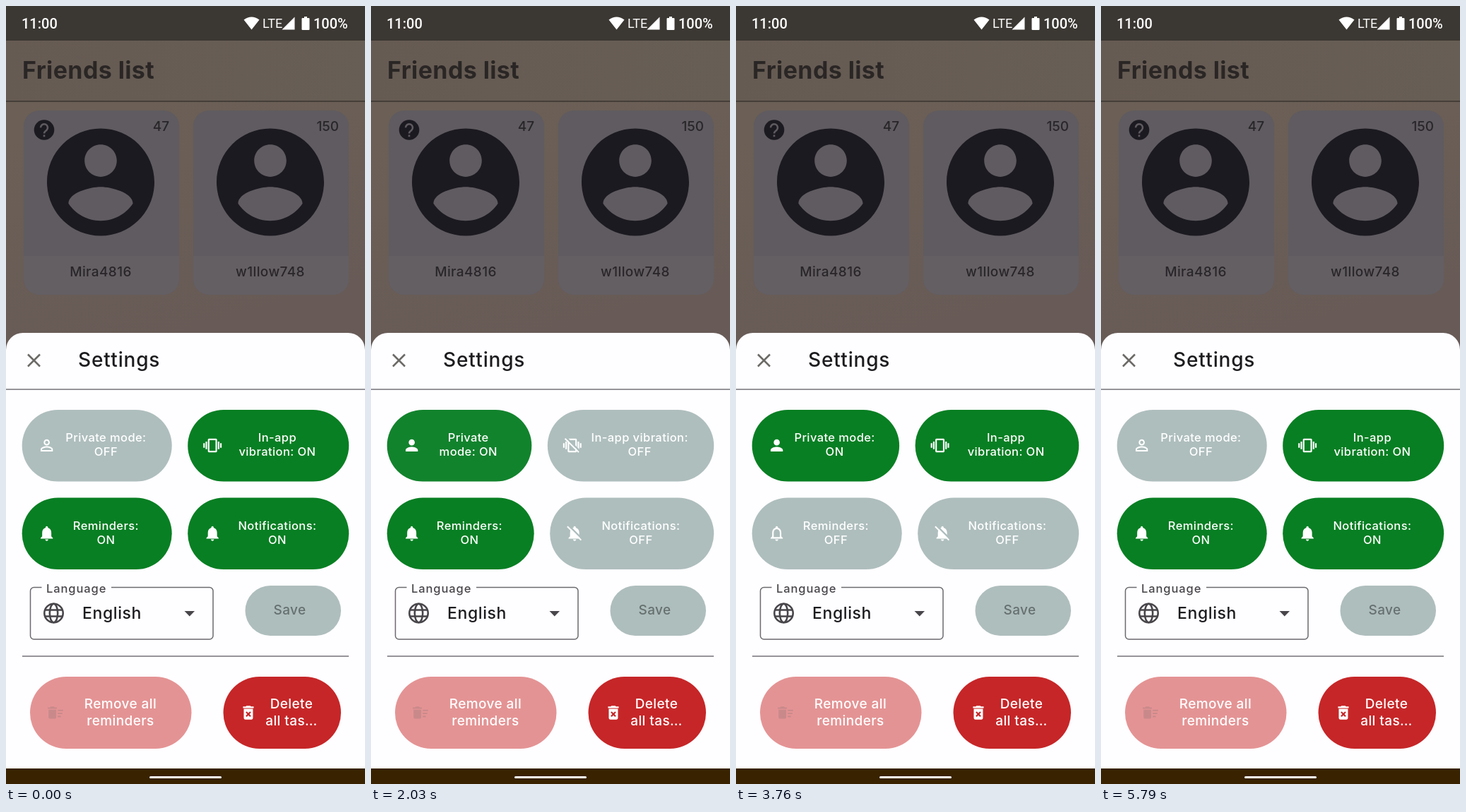
Recreate the animation shown at these times as an HTML page. Size 508 px wide and 1102 px high, loop 5.88 s.

```html
<!DOCTYPE html>
<html lang="en">
<head>
<meta charset="utf-8">
<title>Settings sheet</title>
<style>
  html, body { margin: 0; width: 100%; height: 100%; overflow: hidden; background: #fefdff; }
  svg { display: block; width: 100%; height: 100%; }
  text { font-family: Inter, sans-serif; font-weight: 500; letter-spacing: .4px; }
  .mid { text-anchor: middle; }
  .end { text-anchor: end; letter-spacing: 0; }
  .status { font-family: Roboto, sans-serif; letter-spacing: 0; }
</style>
</head>
<body>
<svg id="stage" viewBox="0 0 508 1102">
  <defs>
    <linearGradient id="wood" x2=".3" y2="1">
      <stop stop-color="#6d6156"/><stop offset=".55" stop-color="#6a5e56"/><stop offset="1" stop-color="#685b57"/>
    </linearGradient>
    <linearGradient id="header" x2="1"><stop stop-color="#665b53"/><stop offset="1" stop-color="#675e55"/></linearGradient>
    <path id="account" d="M12 2C6.48 2 2 6.48 2 12s4.48 10 10 10 10-4.48 10-10S17.52 2 12 2zm0 3c1.66 0 3 1.34 3 3s-1.34 3-3 3-3-1.34-3-3 1.34-3 3-3zm0 14.2c-2.5 0-4.71-1.28-6-3.22.03-1.99 4-3.08 6-3.08 1.99 0 5.97 1.09 6 3.08-1.29 1.94-3.5 3.22-6 3.22z"/>
    <g id="card">
      <rect x="25" y="148" width="220" height="261" rx="22" fill="#5f5b60"/>
      <path d="M25 354H245V387A22 22 0 0 1 223 409H47A22 22 0 0 1 25 387Z" fill="#645f63"/>
      <use href="#account" fill="#1c1a21" transform="translate(42.8 158.3) scale(7.6)"/>
    </g>
  </defs>

  <rect width="508" height="490" fill="url(#wood)"/>
  <rect y="48" width="508" height="87" fill="url(#header)"/>
  <rect width="508" height="49" fill="#3b3732"/>
  <path d="M0 135H508" stroke="#38332f" stroke-width="1.5"/>
  <g fill="#fff">
    <text class="status" x="22" y="32" font-size="20">11:00</text>
    <path d="M336.500 19.500Q347.500 11.500 358.500 19.500L347.500 33.500Z"/>
    <text class="status" x="363" y="31" font-size="18" style="font-weight:400">LTE</text>
    <path d="M408.500 15.500V33.500H390.500Z"/>
    <path d="M422 15H426V17H428.500Q429.500 17 429.500 18V33Q429.500 34 428.500 34H419.500Q418.500 34 418.500 33V18Q418.500 17 419.500 17H422Z"/>
    <text class="status" x="435" y="32" font-size="20">100%</text>
  </g>

  <text x="23" y="103" font-size="34" fill="#2a2625" style="font-weight:650">Friends list</text>
  <use href="#card"/>
  <use href="#card" x="240"/>
  <circle cx="54" cy="175.500" r="14.300" fill="#1c1a21"/>
  <path d="M49 172.300a5 5 0 1 1 8.300 3.700q-3.300 2.400-3.300 4.500M54 182.500v2.700" fill="none" stroke="#5f5b60" stroke-width="2.600"/>
  <g font-size="19" fill="#29262a">
    <text class="end" x="231" y="177">47</text>
    <text class="end" x="471" y="177">150</text>
    <text class="mid" x="134" y="383">Mira4816</text>
    <text class="mid" x="374" y="383">w1llow748</text>
  </g>

  <path d="M0 1081V487A24 24 0 0 1 24 463H484A24 24 0 0 1 508 487V1081Z" fill="#fefdff"/>
  <path d="M31 493.500L48 510.500M48 493.500L31 510.500" stroke="#6b6965" stroke-width="2.500"/>
  <text x="102" y="511" font-size="28" fill="#1c1b1e" style="letter-spacing:.8px">Settings</text>
  <path d="M0 543H508M23 921H485" stroke="#747378" stroke-width="1.500"/>
  <g id="toggles"></g>

  <path d="M50.500 823.500H39.500A5 5 0 0 0 34.500 828.500V892A5 5 0 0 0 39.500 897H288A5 5 0 0 0 293 892V828.500A5 5 0 0 0 288 823.500H149" fill="none" stroke="#6b6a6e" stroke-width="1.500"/>
  <text x="57" y="830.500" font-size="16.500" fill="#48464a" style="letter-spacing:.9px">Language</text>
  <g fill="none" stroke="#48464a" stroke-width="2.600">
    <circle cx="67.500" cy="860" r="13.200"/>
    <ellipse cx="67.500" cy="860" rx="5.700" ry="13.200"/>
    <path d="M55.500 855.500H79.500M55.500 864.500H79.500"/>
  </g>
  <text x="108" y="867.500" font-size="23" fill="#1c1b1e" style="letter-spacing:.6px">English</text>
  <path d="M252.500 857H267L259.750 864.500Z" fill="#48464a"/>
  <rect x="338.500" y="821" width="135.500" height="71" rx="35.500" fill="#aebebd"/>
  <text class="mid" x="401.500" y="862" font-size="19" fill="#65706f">Save</text>

  <rect x="34" y="950" width="228.500" height="102" rx="51" fill="#e49394"/>
  <rect x="307.500" y="950" width="166.500" height="102" rx="51" fill="#c62628"/>
  <path transform="translate(57 988) scale(1.080)" fill="#c9898a" d="M15 16h4v2h-4zm0-8h7v2h-7zm0 4h6v2h-6zM3 18c0 1.100.9 2 2 2h6c1.100 0 2-.9 2-2V8H3v10zM14 5h-3l-1-1H6L5 5H2v2h12z"/>
  <path transform="translate(330 988) scale(1.080)" fill="#fff" d="M6 19c0 1.100.9 2 2 2h8c1.100 0 2-.9 2-2V7H6v12zm2.460-7.120l1.410-1.410L12 12.590l2.120-2.120 1.410 1.410L13.410 14l2.120 2.120-1.410 1.410L12 15.410l-2.120 2.120-1.410-1.410L10.590 14l-2.130-2.120zM15.500 4l-1-1h-5l-1 1H5v2h14V4z"/>
  <g class="mid" font-size="19" fill="#fff">
    <text x="162" y="995">Remove all</text><text x="162" y="1018.500">reminders</text>
    <text x="404" y="995">Delete</text><text x="404" y="1018.500">all tas…</text>
  </g>
  <rect y="1080" width="508" height="22" fill="#382200"/>
  <rect x="203" y="1091" width="102" height="3" rx="1.500" fill="#fff"/>
</svg>
<script>
const LOOP = 5880, TWEEN = 400, GAP = 22.5, ROW_WIDTH = 462.5;
const GREEN = [8, 127, 35], GREY = [174, 190, 189];

const person = 'M12 12c2.21 0 4-1.79 4-4s-1.79-4-4-4-4 1.79-4 4 1.79 4 4 4zm0 2c-2.67 0-8 1.34-8 4v2h16v-2c0-2.66-5.33-4-8-4z';
const personOutline = 'M12 5.900c1.160 0 2.100.94 2.100 2.100s-.94 2.100-2.100 2.100S9.900 9.160 9.900 8s.94-2.100 2.100-2.100m0 9c2.970 0 6.100 1.460 6.100 2.100v1.100H5.900V17c0-.64 3.130-2.100 6.100-2.100M12 4C9.790 4 8 5.790 8 8s1.790 4 4 4 4-1.790 4-4-1.790-4-4-4zm0 9c-2.670 0-8 1.340-8 4v3h16v-3c0-2.660-5.330-4-8-4z';
const vibration = 'M0 15h2V9H0v6zm3 2h2V7H3v10zm19-8v6h2V9h-2zm-3 8h2V7h-2v10zM16.500 3h-9C6.670 3 6 3.670 6 4.500v15c0 .83.67 1.500 1.500 1.500h9c.83 0 1.500-.67 1.500-1.500v-15c0-.83-.67-1.500-1.500-1.500zM16 19H8V5h8v14z';
const bell = 'M12 22c1.100 0 2-.9 2-2h-4c0 1.100.89 2 2 2zm6-6v-5c0-3.070-1.640-5.640-4.500-6.320V4c0-.83-.67-1.500-1.500-1.500s-1.500.67-1.500 1.500v.68C7.630 5.360 6 7.920 6 11v5l-2 2v1h16v-1l-2-2z';
const bellOutline = bell + 'm-2 1H8v-6c0-2.480 1.510-4.500 4-4.500s4 2.020 4 4.500v6z';

// joinWidth: narrowest button in which the first two words share a line
const buttons = [
  { words: ['Private', 'mode:'], joinWidth: 208.2, y: 572, initial: 0, taps: [1790, 4940], on: person, off: personOutline },
  { words: ['In-app', 'vibration:'], joinWidth: 234, y: 572, initial: 1, taps: [10, 2970], on: vibration, off: vibration, slash: true },
  { words: ['Reminders:'], y: 696.5, initial: 1, taps: [3360, 5300], on: bell, off: bellOutline },
  { words: ['Notifications:'], y: 696.5, initial: 1, taps: [640, 4030], on: bell, off: bell, slash: true },
];

function add(parent, tag, attributes = {}) {
  const node = document.createElementNS('http://www.w3.org/2000/svg', tag);
  for (const name in attributes) node.setAttribute(name, attributes[name]);
  return parent.appendChild(node);
}

for (const b of buttons) {
  b.group = add(document.getElementById('toggles'), 'g');
  b.shape = add(b.group, 'rect', { height: 101.5, rx: 50.75 });
  const icon = add(b.group, 'g', { transform: 'translate(22 37.500) scale(1.080)' });
  b.icon = add(icon, 'path', { fill: '#fff' });
  b.cross = add(icon, 'g');
  b.cut = add(b.cross, 'path', { d: 'M4.500 2L22.500 20', 'stroke-width': 2.2 });
  add(b.cross, 'path', { d: 'M2.500 3L20.500 21', stroke: '#fff', 'stroke-width': 1.8 });
  b.lines = [45, 65].map(y => add(b.group, 'text', { y, class: 'mid', 'font-size': 16.5, fill: '#fff' }));
}

function update(b, time) {
  const tapped = b.taps.filter(tap => time >= tap);
  b.isOn = (b.initial + tapped.length) % 2;
  const progress = tapped.length ? Math.min(1, (time - tapped.at(-1)) / TWEEN) : 1;
  const eased = 1 - (1 - progress) ** 3;
  b.level = b.isOn ? eased : 1 - eased;
}

function draw(b, x, width) {
  const color = `rgb(${GREY.map((c, i) => Math.round(c + (GREEN[i] - c) * b.level))})`;
  const state = b.isOn ? 'ON' : 'OFF';
  const [first, second] = b.words;
  const text = !second ? [first, state]
    : width > b.joinWidth ? [`${first} ${second}`, state] : [first, `${second} ${state}`];
  b.group.setAttribute('transform', `translate(${x} ${b.y})`);
  b.shape.setAttribute('width', width);
  b.shape.setAttribute('fill', color);
  b.icon.setAttribute('d', b.isOn ? b.on : b.off);
  b.cross.setAttribute('visibility', b.slash && !b.isOn ? 'visible' : 'hidden');
  b.cut.setAttribute('stroke', color);
  b.lines.forEach((line, i) => {
    line.setAttribute('x', width / 2 + 12.7);
    line.textContent = text[i];
  });
}

function drawRow(left, right, base, leftGain) {
  const width = base - leftGain * left.level + 4 * right.level;
  draw(left, 22.7, width);
  draw(right, 22.7 + width + GAP, ROW_WIDTH - GAP - width);
}

function frame(now) {
  const time = now % LOOP;
  buttons.forEach(b => update(b, time));
  drawRow(buttons[0], buttons[1], 208, 3.6);
  drawRow(buttons[2], buttons[3], 212, 4);
}

const start = performance.now();
function tick() {
  frame(performance.now() - start);
  requestAnimationFrame(tick);
}
tick();
</script>
</body>
</html>
```
